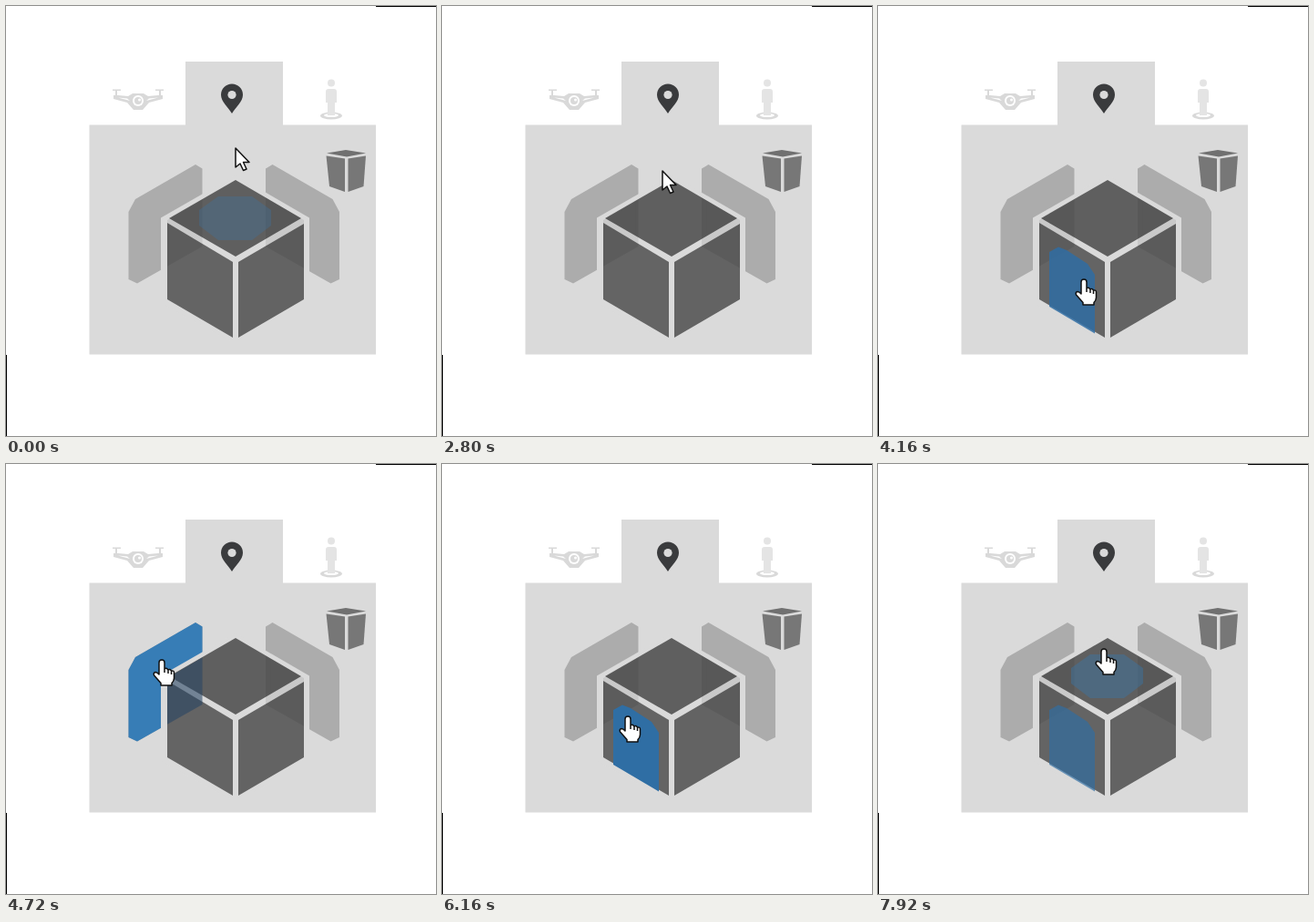
An HTML page for the animation above (8 s loop, 472 by 472 pixels).

```html
<!DOCTYPE html>
<html lang="en">
<head>
<meta charset="utf-8">
<title>View cube</title>
<style>
  html, body { margin: 0; width: 100%; height: 100%; overflow: hidden; background: #fff; }
  svg { display: block; width: 472px; height: 472px; }
  .hover { --k: 0; opacity: var(--k); }
  /* The wing greys out before it turns clear. */
  .wing { opacity: calc(1 - (1 - var(--k)) * (1 - var(--k)) * (1 - var(--k))); filter: saturate(var(--k)); }
</style>
</head>
<body>
<svg viewBox="0 0 472 472">
  <defs>
    <path id="wing" d="M208 174L215.500 178.500V264L144 304.500L134.500 300V226L142 212Z"/>
    <path id="door" d="M188 270L198 264.500L207 268L230 283L238 295V359.500L188 330Z"/>
    <clipPath id="hull"><path d="M252 191L327 235V322L252 366L177 322V235Z"/></clipPath>
  </defs>

  <path d="M406 0H472V1H406ZM0 383H1V472H0Z"/>
  <path d="M91.500 130.500H197V61H304V130.500H406V382.500H91.500Z" fill="#dadada"/>

  <!-- tab icons -->
  <g fill="#d9d9d9">
    <path d="M117 91.500H126V93H117ZM164 91.500H173V93H164ZM120 93H122V98H120ZM168 93H170V98H168Z"/>
    <path d="M118 98H123L134 99L139 96H151L156 99L167 98H172V102L157 106L150 114H140L133 106L118 102Z"/>
    <path d="M123 100.500L133 101.500L136 104ZM167 100.500L157 101.500L154 104Z" fill="#fff"/>
    <circle cx="145" cy="104" r="6" fill="#fff"/>
    <circle cx="145" cy="104" r="4"/>
    <circle cx="146.500" cy="103" r="1.500" fill="#fff"/>
    <ellipse cx="357" cy="120.500" rx="12" ry="4"/>
    <ellipse cx="357" cy="120" rx="8" ry="2" fill="#fff"/>
  </g>
  <g fill="#e4e4e4">
    <circle cx="357" cy="84.500" r="4"/>
    <path d="M354 91H360Q363 91 363 94V106H361V120H353V106H351V94Q351 91 354 91Z"/>
  </g>
  <path d="M248 118C244 111 236 105 236 97.500A12 12 0 0 1 260 97.500C260 105 252 111 248 118Z" fill="#3a3b3d"/>
  <circle cx="248" cy="97.500" r="4.600" fill="#dadada"/>

  <!-- small cube -->
  <g fill="#777">
    <path d="M352 161.500L373 158L395 161.500L374 165.500Z" fill="#707070"/>
    <path d="M351.500 164.500L372 167.500V204L355 198Z"/>
    <path d="M375.500 167.500L395 164.500L392.500 198L375.500 204Z"/>
  </g>

  <!-- side wings and main cube -->
  <use href="#wing" fill="#acacac"/>
  <use href="#wing" fill="#acacac" transform="matrix(-1 0 0 1 500.500 0)"/>
  <use href="#wing" fill="#377db6" class="hover wing"/>
  <path d="M252 185.500L333 232.500V326L252 371L170 326V232.500Z" fill="#dadada"/>
  <path d="M252 191L324 233L252 275L179 233Z" fill="#5f5f5f"/>
  <path d="M177 238L249 281V364L177 322Z" fill="#646464"/>
  <path d="M255 281L327 239V322L255 364Z" fill="#636363"/>
  <g clip-path="url(#hull)">
    <use href="#wing" opacity=".08"/>
    <use href="#wing" opacity=".08" transform="matrix(-1 0 0 1 500.500 0)"/>
    <g class="hover wing"><use href="#wing" fill="#2a4a6a" opacity=".55"/></g>
  </g>
  <path class="hover glow" d="M204 243L214 240L237 253V262L226 260L200 254Z" fill="#2f6491"/>
  <path class="hover top" d="M233 209H270L291 224V241L270 257H233L212 241V224Z" fill="#2f7fc0"/>
  <use class="hover left" href="#door" fill="#2f6ea4"/>
  <use class="hover right" href="#door" fill="#2f6ea4" transform="matrix(-1 0 0 1 504 0)"/>

  <g id="cursor" stroke="#111" stroke-width="1.500" stroke-linejoin="round" fill="#fff">
    <path id="arrow" d="M0 0V21L5 17L8.500 24.500L12 23L8.500 15.500H15Z"/>
    <path id="hand" d="M-3 3Q-3 0 0 0T3 3V10Q5 8 7 11Q9 9.500 10.500 12Q13.500 11.500 13.500 14V20Q13.500 23 11 25.500V28H-1V25.500L-8.500 17Q-9.500 14 -7 13.500Q-5 13.500 -3 16ZM3 10V14M7 11V15M10.500 12V16"/>
  </g>
</svg>

<script>
const LOOP = 8000, STEP = 80, FADE = 240, HAND_FROM = 3040;

// Each part lights up at `on` and starts to dim at `off`.
const hovers = [
  { part: 'top', on: -FADE, off: 80, peak: .24 },
  { part: 'top', on: 2960, off: 3600 },
  { part: 'right', on: 3680, off: 3920 },
  { part: 'left', on: 3960, off: 4320 },
  { part: 'wing', on: 4400, off: 5400 },
  { part: 'left', on: 5840, off: 7840 },
  { part: 'glow', on: 6320, off: 7120, peak: .7 },
  { part: 'top', on: 7840, off: LOOP }
];

// Cursor stops: time, x, y
const stops = [
  [2720, 252, 156], [2800, 242, 181], [3440, 263, 222], [3840, 282, 300], [4240, 212, 300],
  [4720, 171, 215], [5280, 172, 217], [5520, 196, 242], [6960, 215, 321], [7600, 215, 321], [7920, 248, 203]
];

const clamp = v => Math.min(1, Math.max(0, v));
const level = ({ on, off, peak = 1 }, t) => peak * Math.min(clamp((t - on) / FADE), clamp(1 - (t - off) / FADE));

function place(t) {
  const i = Math.max(1, stops.findIndex(stop => stop[0] > t));
  const [a, b] = t >= stops.at(-1)[0] ? stops.slice(-2) : [stops[i - 1], stops[i]];
  const k = clamp((t - a[0]) / (b[0] - a[0]));
  return [1, 2].map(n => Math.round(a[n] + (b[n] - a[n]) * k));
}

const [cursor, arrow, hand] = ['cursor', 'arrow', 'hand'].map(id => document.getElementById(id));
const parts = [...new Set(hovers.map(h => h.part))].map(name => ({
  nodes: document.querySelectorAll('.' + name),
  spans: hovers.filter(h => h.part === name)
}));
const start = performance.now();

function draw(now) {
  const t = Math.floor(Math.max(0, now - start) % LOOP / STEP) * STEP;
  for (const { nodes, spans } of parts) {
    const k = Math.max(...spans.map(span => level(span, t)));
    nodes.forEach(node => node.style.setProperty('--k', k));
  }
  cursor.setAttribute('transform', `translate(${place(t)})`);
  arrow.style.display = t < HAND_FROM ? '' : 'none';
  hand.style.display = t < HAND_FROM ? 'none' : '';
  requestAnimationFrame(draw);
}
draw(start);
</script>
</body>
</html>
```
